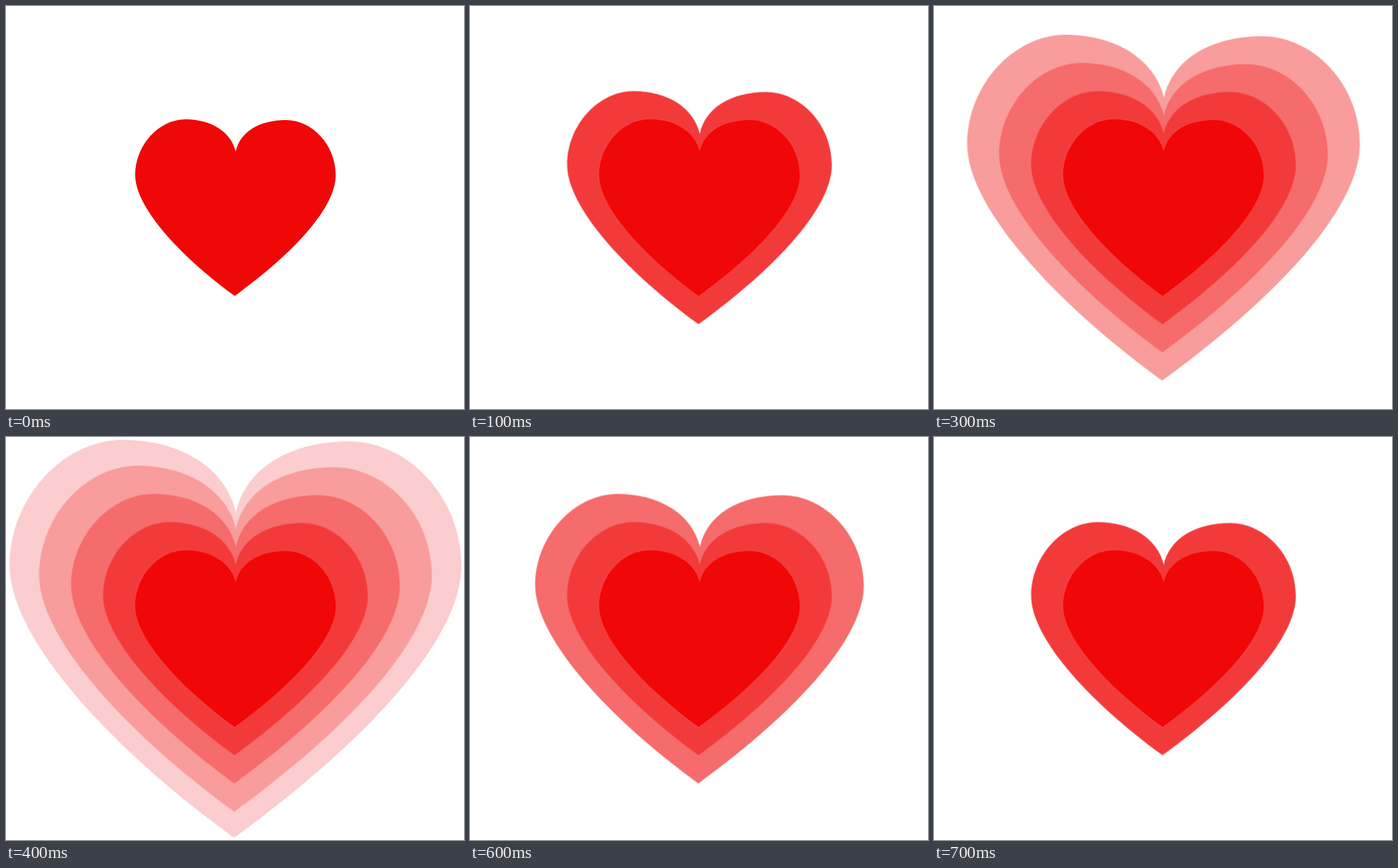
Animation, 638 px wide and 562 px high, one loop 0.8 s. Source, as an HTML page without scripts:

```html
<!DOCTYPE html>
<html lang="en">
<head>
<meta charset="utf-8">
<title>Pulsing heart</title>
<style>
  html, body { margin: 0; width: 100%; height: 100%; overflow: hidden; background: #fff; }
  svg { display: block; width: 638px; height: 562px; }
  use { transform: translate(319.6px, 281px) scale(var(--size)); }
  .ring { opacity: 0; animation: .8s step-end infinite; }

  .core  { --size: 1;     fill: #f00707; }
  .ring1 { --size: 1.32;  fill: #f33a3b; animation-name: ring1; }
  .ring2 { --size: 1.639; fill: #f66b6b; animation-name: ring2; }
  .ring3 { --size: 1.958; fill: #f89c9c; animation-name: ring3; }
  .ring4 { --size: 2.253; fill: #fbcdce; animation-name: ring4; }

  /* Rings appear from the inside out, then vanish in reverse */
  @keyframes ring1 { 0% { opacity: 0 } 12.5% { opacity: 1 } 100% { opacity: 1 } }
  @keyframes ring2 { 0% { opacity: 0 } 25%   { opacity: 1 } 87.5%, 100% { opacity: 0 } }
  @keyframes ring3 { 0% { opacity: 0 } 37.5% { opacity: 1 } 75%, 100%   { opacity: 0 } }
  @keyframes ring4 { 0% { opacity: 0 } 50%   { opacity: 1 } 62.5%, 100% { opacity: 0 } }
</style>
</head>
<body>
<svg viewBox="0 0 638 562">
  <defs>
    <path id="heart" transform="translate(-319.6 -281)"
      d="M320 203C313 174 284 158 250 158C213 158 180 194 180 236
         C180 278 236 344 318.7 404.3C404 342 459.3 280 459.3 236
         C459.3 193 426 159 390 159C354 159 326 175 320 203Z"/>
  </defs>
  <use href="#heart" class="ring ring4"/>
  <use href="#heart" class="ring ring3"/>
  <use href="#heart" class="ring ring2"/>
  <use href="#heart" class="ring ring1"/>
  <use href="#heart" class="core"/>
</svg>
</body>
</html>
```
